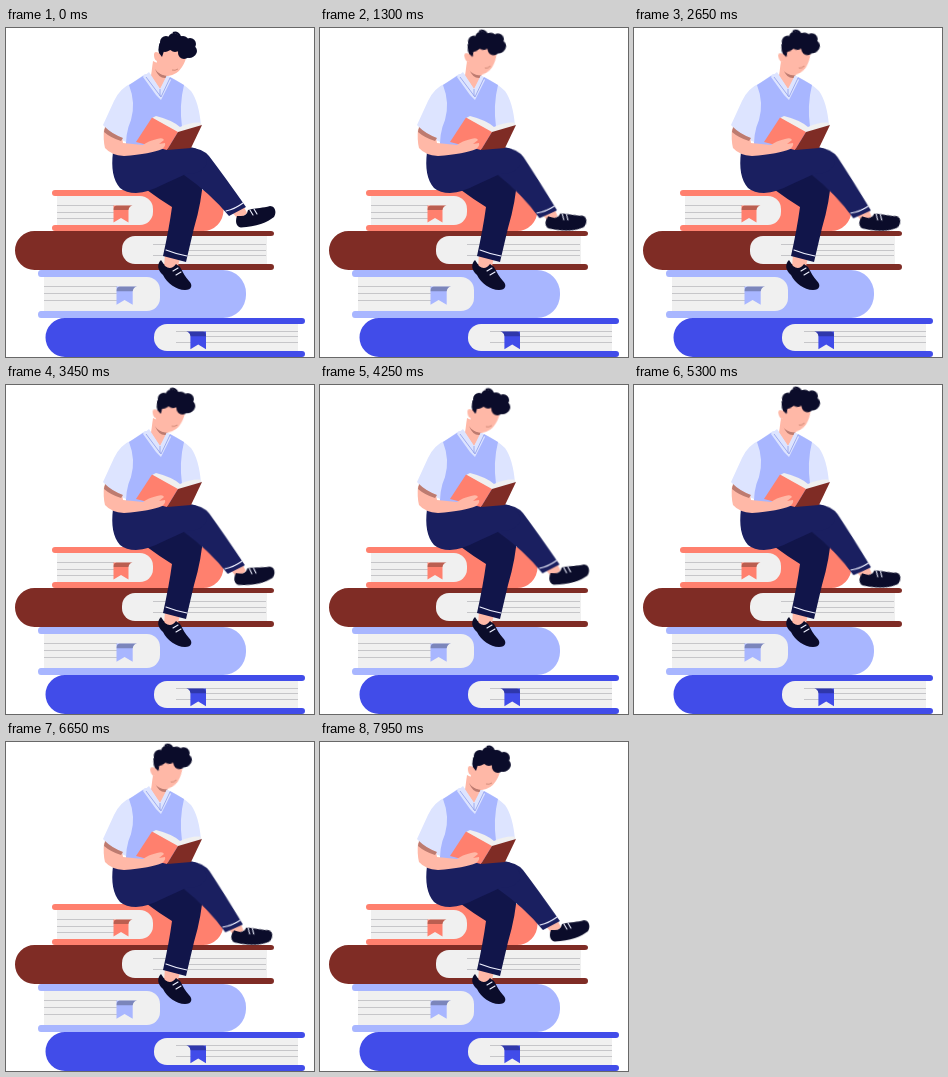
An HTML page for the animation above (8 s loop, 308 px wide and 329 px high).

```html
<!DOCTYPE html>
<html lang="en">
<head>
<meta charset="utf-8">
<title>Reading on a stack of books</title>
<style>
  html, body { margin: 0; width: 100%; height: 100%; overflow: hidden; background: #fff; }
  svg { display: block; width: 100%; height: 100%; }

  .coral { fill: #ff806e; }
  .maroon { fill: #7f2c25; }
  .sky { fill: #a8b6ff; }
  .blue { fill: #414ce9; }
  .page { fill: #f0f0f0; }
  .skin { fill: #ffb8a7; }
  .shade { fill: #bd7b70; }
  .shirt { fill: #dde4ff; }
  .navy { fill: #1a1f60; }
  .deep { fill: #11154a; }
  .ink { fill: #0b0c2a; }
  .fold { fill: #0004; }
  .rules { fill: none; stroke: #c6c6c9; stroke-width: 1; }
  .trim { fill: none; stroke: #eef0ff; stroke-width: 1.1; stroke-linecap: round; }
  .curls { fill: none; stroke: #0b0c2a; stroke-width: 12; stroke-linecap: round; }

  .head, .shin, .foot {
    animation: swing 2s cubic-bezier(.35, .25, .65, .75) infinite alternate;
  }
  .head { transform-origin: 155px 48px; --turn: -15deg; }
  .shin { transform-origin: 187px 136px; --turn: 5.6deg; }
  .foot { transform-origin: 243px 189px; --turn: 18deg; }
  @keyframes swing {
    from { transform: rotate(0deg); }
    to { transform: rotate(var(--turn)); }
  }
</style>
</head>
<body>
<svg viewBox="0 0 308 329" preserveAspectRatio="none">
  <defs>
    <g id="bookmark">
      <path d="M0 0H19Q15.500 .5 15 4.500V17L7.5 12.500L0 17Z"/>
      <path class="fold" d="M3 0H19Q15.500 .5 15 4.500H0Q0 .5 3 0Z"/>
    </g>
  </defs>

  <!-- Books, top to bottom -->
  <g>
    <path class="coral" d="M49 162H197A20.500 20.500 0 0 1 197 203H49Q46 203 46 200T49 197H51V168H49Q46 168 46 165T49 162Z"/>
    <path class="page" d="M51 168H134A13 13 0 0 1 147 181V184A13 13 0 0 1 134 197H51Z"/>
    <path class="rules" d="M51 177.500H108M51 184.500H108M51 190.500H108"/>
    <use href="#bookmark" class="coral" transform="translate(107.500 177.500)"/>
  </g>
  <g>
    <path class="maroon" d="M28.500 203H265Q268 203 268 205.500T265 208H261V236H265Q268 236 268 239T265 242H28.500A19.500 19.500 0 0 1 28.500 203Z"/>
    <path class="page" d="M261 208H129A13 13 0 0 0 116 221V223A13 13 0 0 0 129 236H261Z"/>
    <path class="rules" d="M147 216.500H260M158 222.500H260M147 227.500H260"/>
  </g>
  <g>
    <path class="sky" d="M35 242H217A23 23 0 0 1 240 265V267A23 23 0 0 1 217 290H35Q32 290 32 286.500T35 283H38V249H35Q32 249 32 245.500T35 242Z"/>
    <path class="page" d="M38 249H141A13 13 0 0 1 154 262V270A13 13 0 0 1 141 283H38Z"/>
    <path class="rules" d="M38 258.500H111M38 265.500H111M38 272.500H111"/>
    <use href="#bookmark" class="sky" transform="translate(110.500 258.500) scale(1.08)"/>
  </g>
  <g>
    <path class="blue" d="M59 290H296Q299 290 299 293T296 296H292V323H296Q299 323 299 326T296 329H59A19.500 19.500 0 0 1 59 290Z"/>
    <path class="page" d="M292 296H161A13 13 0 0 0 148 309V310A13 13 0 0 0 161 323H292Z"/>
    <path class="rules" d="M170 303.500H292M190 308.500H292M170 314.500H292"/>
    <use href="#bookmark" class="blue" transform="translate(200 303.500) scale(-1.04 1.04)"/>
  </g>

  <!-- Standing leg -->
  <path class="skin" d="M159 226L174 229L171 243L158 240Z"/>
  <path class="ink" d="M155 232C151 236 151 242 157 247C161 255 170 262 179 262C186 262 187 257 183 253C179 249 177 244 174 239L170 236Q165 243 159 238Z"/>
  <path class="trim" d="M167 243L172 240M170 247L175 244"/>
  <path class="deep" d="M141 162L178 140L197 150Q196 173 188 200L180 234L157 228Q163 201 166 179Q153 171 141 162Z"/>
  <path class="trim" d="M160 222Q170 226 181 228"/>

  <!-- Swinging shin and foot -->
  <g class="shin">
    <path class="skin" d="M222 180L236 175L241 185L233 192Z"/>
    <g class="foot">
      <path class="ink" d="M231 188C229 193 230 199 235 199.500C250 199 262 194 268 189C271 184 269 178 264 178C257 180 250 180 246 181L242 182Q241 188 235 188Z"/>
      <path class="trim" d="M244 182L247 187M248 181L251 186"/>
    </g>
    <path class="navy" d="M184 120Q196 120 203 128Q219 149 240 179L223 188Q204 165 178 147Z"/>
    <path class="trim" d="M220 183Q229 181 237 175"/>
  </g>

  <!-- Torso -->
  <path class="shirt" d="M139 46L126 55Q114 60 108 73L97 97Q106 108 120 114L129 88L178 101L195 98Q193 74 185 63Q177 55 162 48Z"/>
  <path class="sky" d="M137 48L123 57Q130 75 125 92Q119 105 120 125H172L176 99Q173 77 178 57L164 49L155 66Z"/>
  <path class="skin" d="M147 33L145 48L154 61L162 49L161 40Z"/>
  <path class="shade" d="M149 41Q154 48 161 47L160 50Q153 51 149 41Z"/>
  <path class="shirt" d="M143 44L137 49L150 67L155 72L165 52L161 47L154 61Z"/>
  <path d="M140 49L155 69L164 50M154 61V68" fill="none" stroke="#8f9eea" stroke-width=".8"/>

  <!-- Near thigh -->
  <path class="navy" d="M107 124C105 140 107 152 114 160Q120 165 130 165Q143 164 156 157L180 146Q198 146 201 134Q196 120 183 119L157 121Z"/>

  <!-- Open book and arm -->
  <path class="page" d="M146 90L150 88Q166 92 174 99Q184 94 194 94.500L196 97L172 105Z"/>
  <path class="coral" d="M146 89.500L172 104L161 122L130 114Z"/>
  <path class="maroon" d="M172 104L196 97L185 120L161 122Z"/>
  <path class="skin" d="M98 101Q97 112 99 120Q105 127 118 128Q145 126 156 121Q160 118 159 115L153 116L158 112Q157 109 151 111Q142 113 137 117L117 115L116 110Z"/>
  <path class="shade" d="M99 99Q106 106 117 110L115 113Q105 110 98 104Z"/>

  <!-- Head -->
  <g class="head">
    <path class="skin" d="M154 18L153 25Q148 22 148 27Q148 32 151 33L149 40Q153 47 162 48Q171 47 176 39Q180 33 181 25L172 15Z"/>
    <path class="ink" d="M156 12Q151 18 153 25L156 29L158 23Q165 23 168 20L178 29Q187 32 189 26L187 13L170 6Z"/>
    <path class="curls" d="M160 14h0M168 11h0M177 14h0M184 16h0M185 23h0M178 25h0M169 18h0M159 18h0"/>
    <path d="M167 5Q171 3 174 8" fill="none" stroke="#0b0c2a" stroke-width="2"/>
    <path d="M166 42Q169 43 172 41" fill="none" stroke="#c8806f" stroke-width=".8"/>
  </g>
</svg>
</body>
</html>
```
